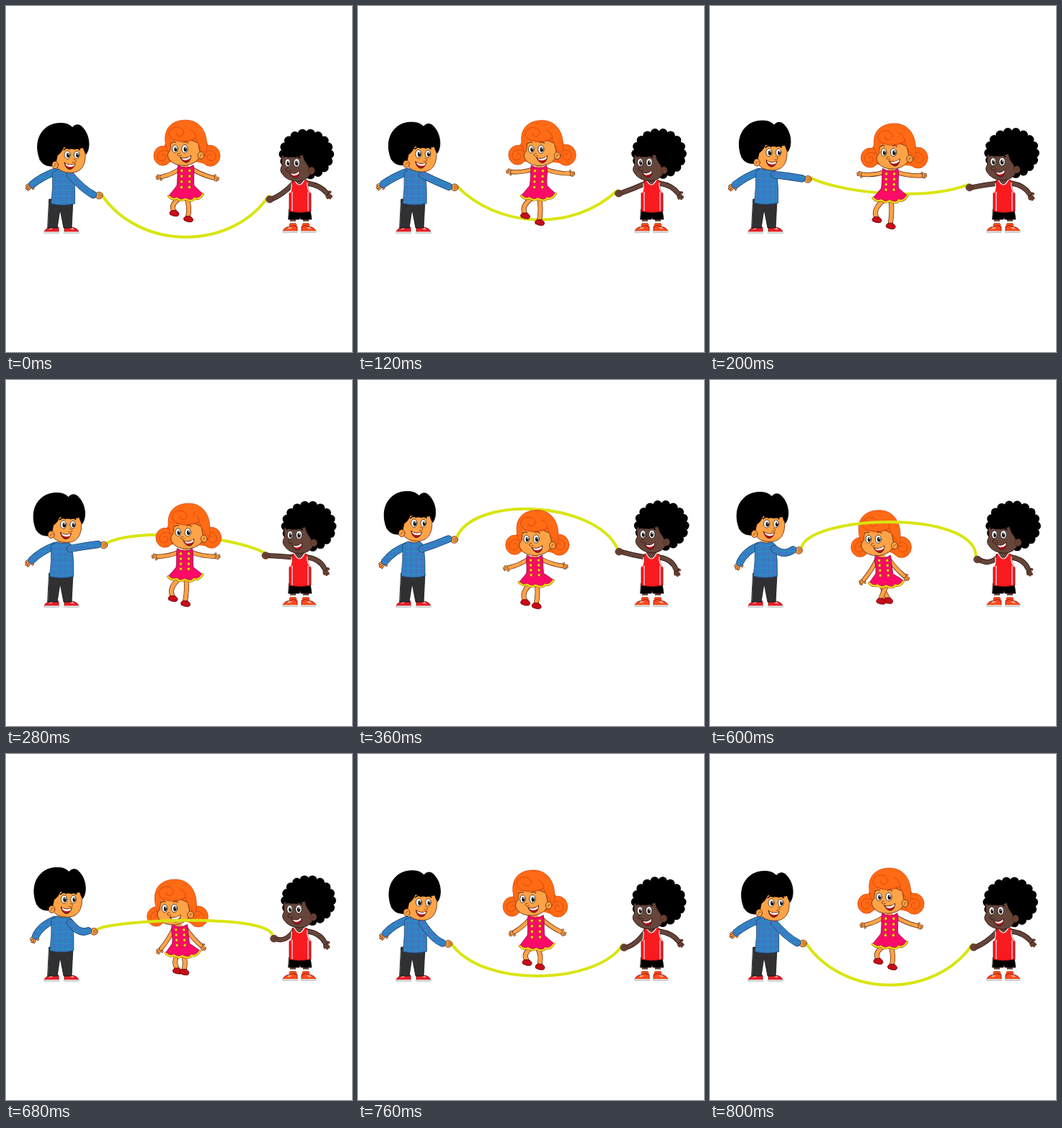
These frames come from a looping animation (480x480 px, 840 ms). An HTML page with a canvas:

```html
<!DOCTYPE html>
<html lang="en">
<head>
<meta charset="utf-8">
<title>Jump rope</title>
<style>
html, body { margin: 0; width: 100%; height: 100%; overflow: hidden; background: #fff; }
canvas { display: block; width: 480px; height: 480px; }
</style>
</head>
<body>
<canvas id="stage"></canvas>
<script>
const LOOP = 840, STEP = 40;
const SKIN = '#ffa347', BROWN = '#66453a', HAIR = '#ff6a14', SWIRL = '#d9480f', BLACK = '#000',
      PINK = '#fb0a68', GOLD = '#f7dc16', RED = '#ef1c24', LINE = '#5a2412', DARK = '#22110c', NAVY = '#1d456e';

// Rope angle in degrees at key times: slow over the top, fast on the way down.
const TURNS = [[0, 0], [200, 76], [360, 140], [480, 180], [600, 237], [680, 263], [800, 360]];
let turn = 0;

function turnAt(t) {
  const i = TURNS.findIndex(([time]) => time > t);
  if (i < 0) return 0;
  const [t0, a] = TURNS[i - 1], [t1, b] = TURNS[i];
  return (a + (b - a) * (t - t0) / (t1 - t0)) * Math.PI / 180;
}
// Every moving part sways with the rope: mean, cosine part, sine part.
const wave = (mean, c = 0, s = 0) => mean + c * Math.cos(turn) + s * Math.sin(turn);

const stage = document.getElementById('stage');
const ratio = window.devicePixelRatio || 1;
stage.width = stage.height = 480 * ratio;
const g = stage.getContext('2d');
g.lineCap = g.lineJoin = 'round';

function makePlaid() {
  const tile = document.createElement('canvas');
  tile.width = tile.height = 8;
  const p = tile.getContext('2d');
  p.fillStyle = '#347fc6';
  p.fillRect(0, 0, 8, 8);
  p.fillStyle = '#5668b4';
  p.fillRect(1, 0, 1, 8);
  p.fillStyle = '#2795bd';
  p.fillRect(0, 5, 8, 1);
  return g.createPattern(tile, 'repeat');
}
const PLAID = makePlaid();

function shape(d, fill, line = LINE, w = 0.8) {
  const p = new Path2D(d);
  if (fill) { g.fillStyle = fill; g.fill(p); }
  if (line) { g.strokeStyle = line; g.lineWidth = w; g.stroke(p); }
}
function oval(x, y, rx, ry, fill, line) {
  g.beginPath();
  g.ellipse(x, y, rx, ry, 0, 0, 7);
  g.fillStyle = fill;
  g.fill();
  if (line) { g.strokeStyle = line; g.lineWidth = 0.8; g.stroke(); }
}
function limb([x, y, mx, my, ex, ey], w, fill, line = LINE) {
  const d = `M${x} ${y}Q${mx} ${my} ${ex} ${ey}`;
  shape(d, null, line, w + 1.4);
  shape(d, null, fill, w);
}
function at(x, y, angle, draw) {
  g.save();
  g.translate(x, y);
  g.rotate(angle);
  draw();
  g.restore();
}
function openHand([, , mx, my, x, y], size, fill) {
  at(x, y, Math.atan2(y - my, x - mx), () => {
    g.scale(size, size);
    for (const [fx, fy] of [[9, -2], [9.5, 1], [7, 3.5], [3, -5]]) limb([1, 0, fx / 2, fy, fx, fy], 2, fill);
    oval(2, 0, 4, 3, fill);
  });
}
function fist(x, y, fill) {
  oval(x, y, 5.2, 4.8, fill, LINE);
  shape(`M${x - 1} ${y - 2}h4M${x - 1} ${y}h5M${x - 1} ${y + 2}h4`, null, LINE, 0.5);
}
// Arm turning the rope; the elbow hangs lower while the hand moves back.
function ropeArm(x, y, hx, hy) {
  return [x, y, (x + hx) / 2, (y + hy) / 2 + wave(5, 0, -6), hx, hy];
}
function ear(x, y, fill) {
  oval(x, y, 4.4, 5, fill, LINE);
  shape(`M${x + 2} ${y - 1}q-3 -2 -3 3`, null, LINE, 0.6);
}
function eye(x, y, rx, ry, look) {
  oval(x, y, rx, ry, '#fff', '#222');
  oval(x + look, y + 0.6, rx * 0.52, ry * 0.58, '#111');
  oval(x + look + 0.6, y - 1, 0.8, 0.9, '#fff');
}
function smile(x, y, w, angle) {
  at(x, y, angle, () => {
    shape(`M${-w} -2Q0 2 ${w} -3Q${w * 0.8} 6 0 6Q${-w * 0.7} 5 ${-w} -2Z`, '#b5151b', '#3a0d08');
    shape(`M${-w + 1} -1.4Q0 2 ${w - 0.6} -2.4L${w - 1.6} 1Q0 4 ${-w + 3} 1.4Z`, '#fff', null);
  });
}
function sneaker(x, y, dir, fill) {
  at(x, y, 0, () => {
    g.scale(dir, 1);
    shape('M-8 4V-3Q-2 -6 2 -3Q11 -2 12 4Z', fill, '#701010');
    shape('M-8.5 4H12', null, '#ddd', 2);
    shape('M-8.5 5.2H12', null, '#888', 0.5);
    shape('M0 -2l3 2M3 -2l2 2', null, '#fff', 1);
  });
}

// Hands circle a little; the middle of the rope makes the big circle.
const ropeEnds = () => {
  const lead = Math.cos(turn + 0.32);
  return [wave(132, 0, 7), 240 + 22 * lead, wave(364, 0, -6), 249 + 16 * lead];
};
function drawRope() {
  const [x0, y0, x1, y1] = ropeEnds();
  const pull = (8 * wave(240.5, 80) - y0 - y1) / 6, tilt = wave(0, 0, 5);
  shape(`M${x0} ${y0}C${wave(163, 22, 20)} ${pull - tilt} ${wave(332, -20, -30)} ${pull + tilt} ${x1} ${y1}`,
    null, '#d9e510', 4);
}

function drawBlueBoy() {
  const [hx, hy] = ropeEnds();
  const back = [68, 230, 49, 237, wave(38, -1.5, -3), wave(250.5, -3, -1.5)];
  sneaker(65, 310, -1, RED);
  sneaker(89, 310, 1, RED);
  shape('M60 268H93L91 308H80L75 282L71 308H58Z', '#303033', '#111');
  openHand(back, 1, SKIN);
  limb(back, 9, PLAID, NAVY);
  shape('M72 216H84V230H72Z', SKIN, null);
  at(wave(1, 1.5), wave(1, 1.3), 0, () =>
    shape('M70 224Q78 228 86 224L91 229Q94 250 93 272Q76 276 60 272Q63 250 62 229Z', PLAID, NAVY));
  fist(hx - 3, hy + 2, SKIN);
  limb(ropeArm(89, 234, hx - 11, hy + 1), 9, PLAID, NAVY);
  at(wave(85, 4.2), wave(209, 4.5), 0, () => {
    shape('M-18 -18L19 -19Q23 -5 19 6Q15 17 2 18Q-15 18 -20 8Z', SKIN);
    shape('M-42 0C-53 -28 -38 -52 -12 -51C-6 -51 -1 -49 3 -45C7 -50 13 -50 17 -45C26 -36 29 -18 22 -8' +
      'Q19 -12 18 -17Q4 -13 -9 -18Q-12 -10 -18 -6L-21 8Q-36 11 -42 0Z', BLACK, BLACK);
    ear(-21, 7, SKIN);
    eye(-4, -7, 4.2, 5.6, 1);
    eye(9, -7, 3.8, 5.2, 1);
    shape('M-9 -14q4 -4 8 -1M6 -15q4 -3 7 1', null, BLACK, 1.6);
    shape('M5 -1q5 1 2 4q-2 1 -4 0', SKIN, LINE, 0.7);
    smile(-1, 7, 7.5, 0.15);
  });
}

function drawRedBoy() {
  const [, , hx, hy] = ropeEnds();
  const back = [419, 246, 436, 249, wave(442.5, 2), wave(261, -2)];
  for (const dir of [-1, 1]) {
    const x = 407 + dir * 9;
    shape(`M${x} 290V304`, null, BROWN, 8);
    shape(`M${x - 3} 300h6`, null, '#fff', 2.5);
    shape(`M${x - 3} 304h6`, null, '#ff4a1c', 5);
    sneaker(x + dir * 2, 309, dir, '#ff4a1c');
  }
  shape('M393 282H422L424 296H409L408 291L407 296H392Z', BLACK, BLACK);
  openHand(back, 0.95, BROWN);
  limb(back, 5.5, BROWN, DARK);
  shape('M400 234H414V256H400Z', BROWN, null);
  limb(ropeArm(399, 246, hx + 4, hy + 4), 5.5, BROWN, DARK);
  fist(hx + 2, hy + 4, BROWN);
  shape('M397 242L400 241Q407 255 414 241L418 242Q418 254 423 260V285Q408 288 393 285V260Q398 254 397 242Z', '#f91a1f', '#7d0b10');
  shape('M400 241Q407 255 414 241', null, '#fff', 1.2);
  shape('M397 258V284M419 258V284M396 246Q397 254 394 259M418 245Q417 253 422 259', null, '#fff', 1.1);
  at(wave(399.3, -2.5), wave(216.5, 2), 0, () => {
    oval(20, -13, 35, 31, BLACK);
    for (let i = 0; i < 18; i++) {
      const a = i * Math.PI / 9;
      oval(20 + 32 * Math.cos(a), -13 + 29 * Math.sin(a), 6.3, 6.3, BLACK);
    }
    shape('M-14 -11Q2 -6 15 -12Q17 -3 21 1L27 12Q22 24 8 25Q-8 24 -14 14Q-18 9 -14 3Z', BROWN, DARK);
    ear(27, 10, BROWN);
    eye(-6, -1, 3.8, 5.4, 0.6);
    eye(6.5, -1, 4.2, 5.7, 0);
    shape('M-11 -9q3 -3 7 0M3 -9q4 -3 8 1', null, BLACK, 1.6);
    shape('M-5 6q-6 1 -3 4q3 2 6 0', BROWN, DARK, 0.7);
    smile(4, 14, 7, -0.15);
  });
}

function curl(x, y, r, dir) {
  oval(x, y, r, r + 1, HAIR, SWIRL);
  at(x, y, 0, () => {
    g.scale(dir, 1);
    shape('M-9 -5Q2 -11 7 -2Q9 7 1 7Q-6 6 -4 0Q-1 -4 2 0', null, SWIRL, 0.9);
  });
}

function girlLeg(hipX, hipY, footX, footY, bend) {
  limb([hipX, hipY, footX + bend, (hipY + footY) / 2, footX, footY], 5.5, SKIN);
  at(footX, footY + 2, 0, () =>
    shape('M-5 3Q-8 0 -3 -3L3 -3Q10 2 5 5Q0 6 -5 3Z', '#c90c18', '#5c060a'));
}
function girlArm(x, y, dir, reach, drop) {
  const arm = [x + dir * 8, y + 5, x + dir * reach * 0.6, y + 6 + drop * 0.45, x + dir * reach, y + drop];
  openHand(arm, 0.8, SKIN);
  limb(arm, 4.8, SKIN);
}

function drawDress(x, y, mx, my) {
  const l = x - 10.5, r = x + 10.5, lx = mx - 23, ly = my - 6, rx = mx + 25, ry = my - 9;
  const wx = (x + mx) / 2, wy = y + (my - y) * 0.58;
  const hem = `Q${rx - 6} ${ry + 9} ${rx - 12} ${ry + 6}Q${(mx + rx) / 2 - 2} ${my + 3} ${mx} ${my - 2}` +
    `Q${mx - 6} ${my + 2} ${(mx + lx) / 2} ${my - 3}Q${lx + 6} ${ly + 6} ${lx} ${ly}`;
  shape(`M${l} ${y}Q${x} ${y + 7} ${r} ${y}L${r + 1} ${y + 8}Q${wx + 11} ${wy - 6} ${wx + 12} ${wy}` +
    `Q${rx - 5} ${ry - 4} ${rx} ${ry}${hem}Q${wx - 15} ${wy + 4} ${wx - 12} ${wy}Q${wx - 11} ${wy - 6} ${l - 1} ${y + 8}Z`,
    PINK, '#8a0638');
  shape(`M${rx} ${ry}${hem}`, null, '#8a5a10', 3.2);
  shape(`M${rx} ${ry}${hem}`, null, GOLD, 2.2);
  for (let i = 0; i < 4; i++) {
    const u = 0.2 + i * 0.27, bx = x + (wx - x) * u, by = y + (wy - y) * u + 2;
    for (const side of [-5.5, 5.5]) oval(bx + side, by, 2.1, 2.1, GOLD, '#a04010');
  }
}

function drawGirl() {
  const hx = wave(245.5, 4, 10), top = wave(171, -14.5, -3) + 1.75 * Math.cos(2 * turn);
  const cl = hx + wave(-30.5, -1.5, -3.5), cr = hx + wave(32, 2), cy = top + wave(49.5, 0, -2);
  const x = wave(245.5, 4, 4), y = top + 62.5;
  const mx = wave(246.5, 2, 2), my = y + wave(46, 3);
  const cross = Math.max(0, Math.cos(turn - 4.15)) ** 16;
  shape(`M${hx - 25} ${top + 25}L${cl} ${cy - 10}L${cl + 8} ${cy + 9}L${hx - 16} ${top + 58}Z`, HAIR, null);
  shape(`M${hx + 25} ${top + 25}L${cr} ${cy - 11}L${cr - 4} ${cy + 12}L${hx + 14} ${top + 58}Z`, HAIR, null);
  curl(cl, cy, 12.5, -1);
  curl(cr, cy, 13.5, 1);
  girlLeg(mx - 6, my - 4, wave(233, 0, -2) + 12 * cross, wave(296.5, -12), -6);
  girlLeg(mx + 2, my - 4, wave(249.5, 3) - 11 * cross, wave(301.5, -9, 3), 3);
  girlArm(x, y, -1, wave(32, 1, 6), wave(21, -5, -12));
  girlArm(x, y, 1, wave(35.5, 2, 6), wave(19.5, -2, -9.5));
  shape(`M${hx - 3} ${top + 58}L${x} ${y + 3}`, null, SKIN, 8);
  drawDress(x, y, mx, my);
  at(hx, top, 0, () => {
    shape('M-28 34C-32 12 -20 0 0 0C21 0 33 20 28 46Q24 54 14 54L-18 50Q-27 44 -28 34Z', HAIR, SWIRL);
    shape('M-20 28Q0 22 17 32L20 46Q19 60 0 63Q-18 64 -24 53Q-27 47 -22 42Z', SKIN);
    shape('M-28 34C-30 8 -12 4 2 4C18 6 27 24 26 44Q18 38 14 25Q4 31 -18 28Q-22 30 -22 40Z', HAIR, null);
    shape('M-18 28Q4 31 14 25Q18 38 26 44', null, SWIRL, 0.8);
    shape('M14 25Q6 31 -8 30Q-26 26 -23 16Q-18 7 -7 11Q1 17 -6 22Q-13 24 -13 18M14 25Q15 18 6 13', null, SWIRL, 0.9);
    ear(21, 49, SKIN);
    eye(-15, 40, 3.8, 5.4, 0.8);
    eye(-1.5, 40, 4.2, 5.7, 0.8);
    shape('M-20 32q3 -3 6 -1M-3 31q4 -2 6 1', null, '#8a3208', 1.3);
    shape('M-8 46q-5 0 -3 3q2 2 5 0', SKIN, LINE, 0.7);
    smile(0, 53, 7.5, -0.12);
  });
}

function draw(t) {
  turn = turnAt(t);
  g.setTransform(ratio, 0, 0, ratio, 0, 0);
  g.fillStyle = '#fff';
  g.fillRect(0, 0, 480, 480);
  // The rope rises behind the girl and comes down in front of her.
  const inFront = turn > Math.PI + 0.01;
  if (!inFront) drawRope();
  drawGirl();
  if (inFront) drawRope();
  drawBlueBoy();
  drawRedBoy();
}

function tick() {
  draw(Math.floor(performance.now() % LOOP / STEP) * STEP);
  requestAnimationFrame(tick);
}
tick();
</script>
</body>
</html>
```
